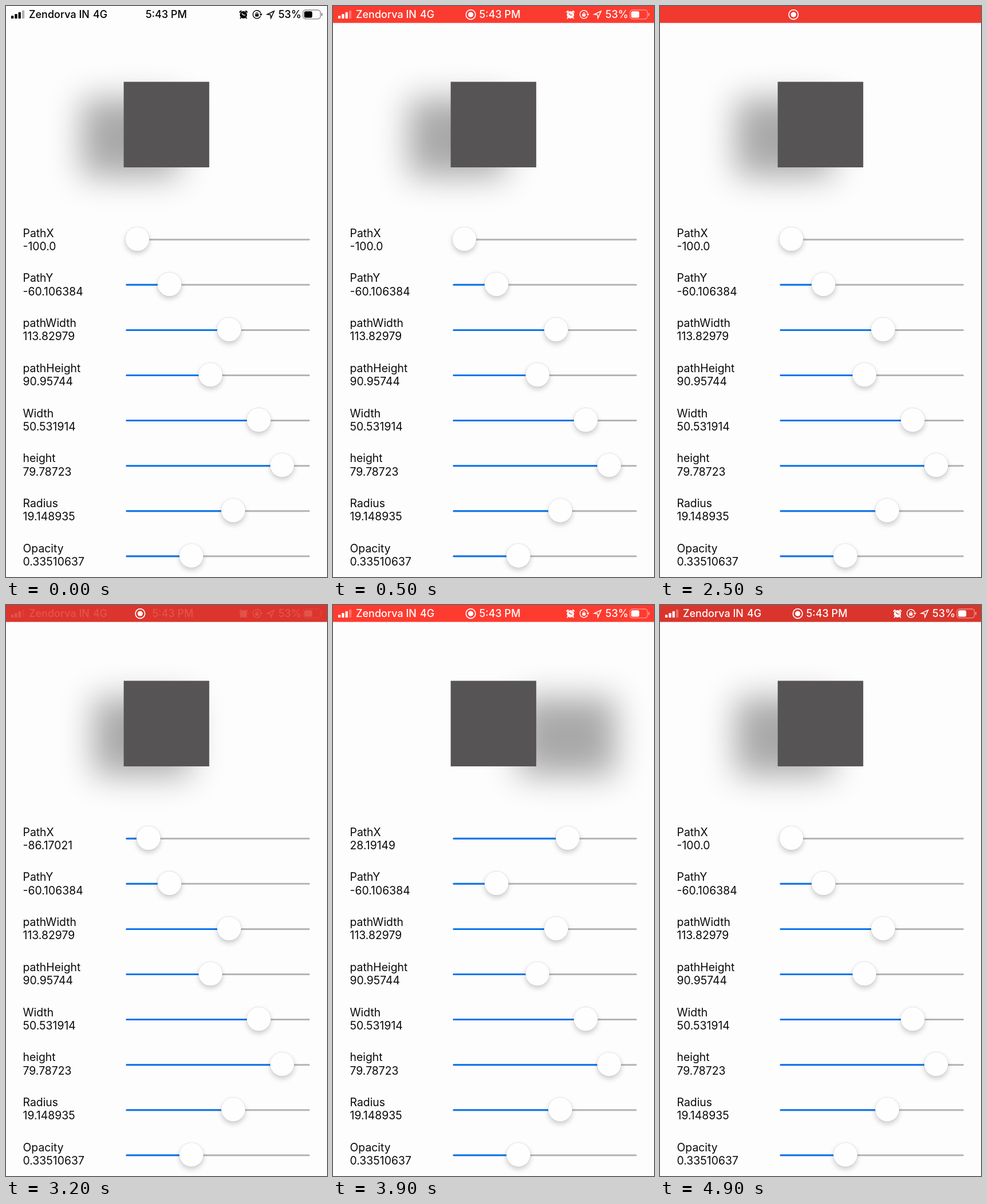
Recreate the animation shown at these times as an HTML page with a canvas. Size 561 by 998 pixels, loop 5 s.

```html
<!DOCTYPE html>
<html lang="en">
<head>
<meta charset="utf-8">
<title>Shadow path sliders</title>
<style>
  html, body { margin: 0; width: 100%; height: 100%; overflow: hidden; background: #fefdfe; }
  canvas { display: block; width: 561px; height: 998px; }
</style>
</head>
<body>
<canvas id="stage" width="561" height="998"></canvas>
<script>
const ctx = document.getElementById('stage').getContext('2d');
const LOOP = 5000, STEP = 100, PT = 1.496;
const BACK = '#fefdfe';
const TRACK = { left: 209.5, right: 531, first: 229.5, span: 282 };

// label, value text, slider fraction
const rows = [
  ['PathX', '', 0],
  ['PathY', '-60.106384', 0.1995],
  ['pathWidth', '113.82979', 0.569],
  ['pathHeight', '90.95744', 0.4535],
  ['Width', '50.531914', 0.7527],
  ['height', '79.78723', 0.8975],
  ['Radius', '19.148935', 0.5945],
  ['Opacity', '0.33510637', 0.3351]
];

// time, PathX value while dragging
const drag = [[3100, -100], [3300, -72], [3500, -39.9], [3900, 28.2],
  [4100, 36], [4300, 10], [4700, -100]];

const clamp = v => Math.max(0, Math.min(1, v));
const mix = (a, b, k) => a + (b - a) * k;
const ease = (t, from, to) => {
  const k = clamp((t - from) / (to - from));
  return k * k * (3 - 2 * k);
};

function pathX(t) {
  let v = -100;
  for (let i = 1; i < drag.length; i++) {
    const [t0, a] = drag[i - 1], [t1, b] = drag[i];
    if (t >= t0 && t < t1) v = mix(a, b, (t - t0) / (t1 - t0));
  }
  // sliders move in half-point steps
  return Math.round((v + 100) * 1.88) / 1.88 - 100;
}

// shortest text that reads back as the same 32-bit float
function floatText(v) {
  const f = Math.fround(v);
  if (Number.isInteger(f)) return f.toFixed(1);
  for (let p = 1; p < 10; p++) {
    const s = f.toPrecision(p);
    if (Math.fround(s) === f) return String(Number(s));
  }
  return String(f);
}

function text(s, x, y, font, color, align = 'left') {
  ctx.font = font + ' Inter, Roboto, sans-serif';
  ctx.fillStyle = color;
  ctx.textAlign = align;
  ctx.fillText(s, x, y);
}

function disc(x, y, r, color) {
  ctx.fillStyle = color;
  ctx.beginPath();
  ctx.arc(x, y, r, 0, Math.PI * 2);
  ctx.fill();
}

function line(points, color, width, close) {
  ctx.strokeStyle = color;
  ctx.lineWidth = width;
  ctx.beginPath();
  points.forEach(([x, y]) => ctx.lineTo(x, y));
  if (close) ctx.closePath();
  ctx.stroke();
}

function arc(x, y, r, from, to, color, width) {
  ctx.strokeStyle = color;
  ctx.lineWidth = width;
  ctx.beginPath();
  ctx.arc(x, y, r, from, to);
  ctx.stroke();
}

function box(x, y, w, h, r, color) {
  ctx.fillStyle = color;
  ctx.beginPath();
  ctx.roundRect(x, y, w, h, r);
  ctx.fill();
}

function square(value) {
  const far = 3000;
  ctx.save();
  ctx.shadowColor = 'rgba(0,0,0,0.335)';
  ctx.shadowBlur = 2 * 19.149 * PT;
  ctx.shadowOffsetX = far;
  ctx.fillStyle = '#000';
  ctx.fillRect(206 + (value + 50.53) * PT - far, 132.5 + (79.787 - 60.106) * PT,
    113.83 * PT, 90.957 * PT);
  ctx.restore();
  ctx.fillStyle = '#565455';
  ctx.fillRect(205.7, 132.5, 149.5, 149.5);
}

function slider(x, y) {
  box(TRACK.left, y - 1.5, TRACK.right - TRACK.left, 3, 1.5, '#b5b3b5');
  box(TRACK.left, y - 1.5, x - TRACK.left, 3, 1.5, '#0a76ec');
  ctx.save();
  ctx.shadowColor = 'rgba(0,0,0,0.2)';
  ctx.shadowBlur = 10;
  ctx.shadowOffsetY = 4.5;
  disc(x, y - 1, 20.8, '#fff');
  ctx.restore();
  arc(x, y - 1, 21, 0, Math.PI * 2, 'rgba(0,0,0,0.13)', 0.8);
  disc(x, y - 1, 20.7, '#fefefe');
}

function alarm(x, y, ink, paper) {
  disc(x, y + 0.6, 6.3, ink);
  line([[x - 7, y - 3.6], [x - 3.6, y - 6.6]], ink, 2.2);
  line([[x + 7, y - 3.6], [x + 3.6, y - 6.6]], ink, 2.2);
  line([[x - 4, y + 5], [x - 5.8, y + 7.3]], ink, 1.8);
  line([[x + 4, y + 5], [x + 5.8, y + 7.3]], ink, 1.8);
  line([[x - 3, y - 1.8], [x, y + 1], [x + 3.4, y + 1]], paper, 1.3);
}

function rotationLock(x, y, ink) {
  arc(x, y, 7, 0.45, Math.PI * 1.9, ink, 1.4);
  ctx.fillStyle = ink;
  ctx.beginPath();
  ctx.moveTo(x + 4.4, y - 1.2);
  ctx.lineTo(x + 9.6, y - 1.2);
  ctx.lineTo(x + 7, y + 2.4);
  ctx.fill();
  box(x - 3, y - 0.8, 6, 4.4, 0.8, ink);
  arc(x, y - 1, 1.9, Math.PI, 0, ink, 1.2);
}

function battery(ink) {
  ctx.save();
  ctx.globalAlpha *= 0.45;
  ctx.strokeStyle = ink;
  ctx.lineWidth = 1.4;
  ctx.beginPath();
  ctx.roundRect(519, 7, 30.5, 15.6, 4.5);
  ctx.stroke();
  box(551, 12, 2, 5.6, 1.5, ink);
  ctx.restore();
  box(521.2, 9.2, 14, 11.2, 2.5, ink);
}

function statusItems(ink, paper, clockX) {
  const font = '500 18px';
  for (let i = 0; i < 4; i++) {
    const h = 5 + i * 3.1;
    box(9 + i * 6.3, 22 - h, 4.3, h, 1, ink);
    if (i === 2) ctx.globalAlpha *= 0.3;
  }
  ctx.globalAlpha /= 0.3;
  text('Zendorva IN', 40, 21.2, font, ink);
  text('4G', 152, 21.2, font, ink);
  text('5:43 PM', clockX, 21.2, font, ink, 'center');
  alarm(415, 14.8, ink, paper);
  rotationLock(438.5, 14.8, ink);
  line([[468.5, 9], [456.5, 14.6], [462.3, 15.4], [463, 21.2]], ink, 1.5, true);
  text('53%', 476, 21.2, font, ink);
  battery(ink);
}

function statusBar(t) {
  const on = ease(t, 50, 400);
  const hidden = ease(t, 850, 1300) * (1 - ease(t, 3100, 3500));
  const pulse = 0.5 + 0.5 * Math.cos((t - 350) / 1800 * Math.PI * 2);
  const red = `rgb(${mix(217, 255, pulse)},${mix(53, 59, pulse)},${mix(45, 48, pulse)})`;
  const shade = Math.round(on * 255);
  const ink = `rgb(${shade},${shade},${shade})`;

  ctx.globalAlpha = on;
  ctx.fillStyle = red;
  ctx.fillRect(0, 0, 561, 29.6);
  const x = mix(240.7, 233.3, hidden);
  arc(x, 15, 8.3, 0, Math.PI * 2, '#fff', 1.7);
  disc(x, 15, 4.6, '#fff');

  ctx.globalAlpha = 1 - hidden;
  if (hidden < 1) statusItems(ink, on > 0.5 ? red : BACK, mix(280, 291.5, on));
  ctx.globalAlpha = 1;
}

function draw(t) {
  const value = pathX(t);
  ctx.fillStyle = BACK;
  ctx.fillRect(0, 0, 561, 998);
  square(value);
  rows.forEach(([label, shown, part], i) => {
    const y = 403.6 + i * 78.75, k = i ? part : (value + 100) / 200;
    text(label, 29.5, y, '400 19.4px', '#0b0b0b');
    text(i ? shown : floatText(value), 29.5, y + 23.3, '400 19.4px', '#0b0b0b');
    slider(TRACK.first + k * TRACK.span, 408.3 + i * 79.07);
  });
  statusBar(t);
}

function tick() {
  const t = performance.now() % LOOP;
  draw(Math.floor(t / STEP) * STEP);
  requestAnimationFrame(tick);
}
tick();
</script>
</body>
</html>
```
